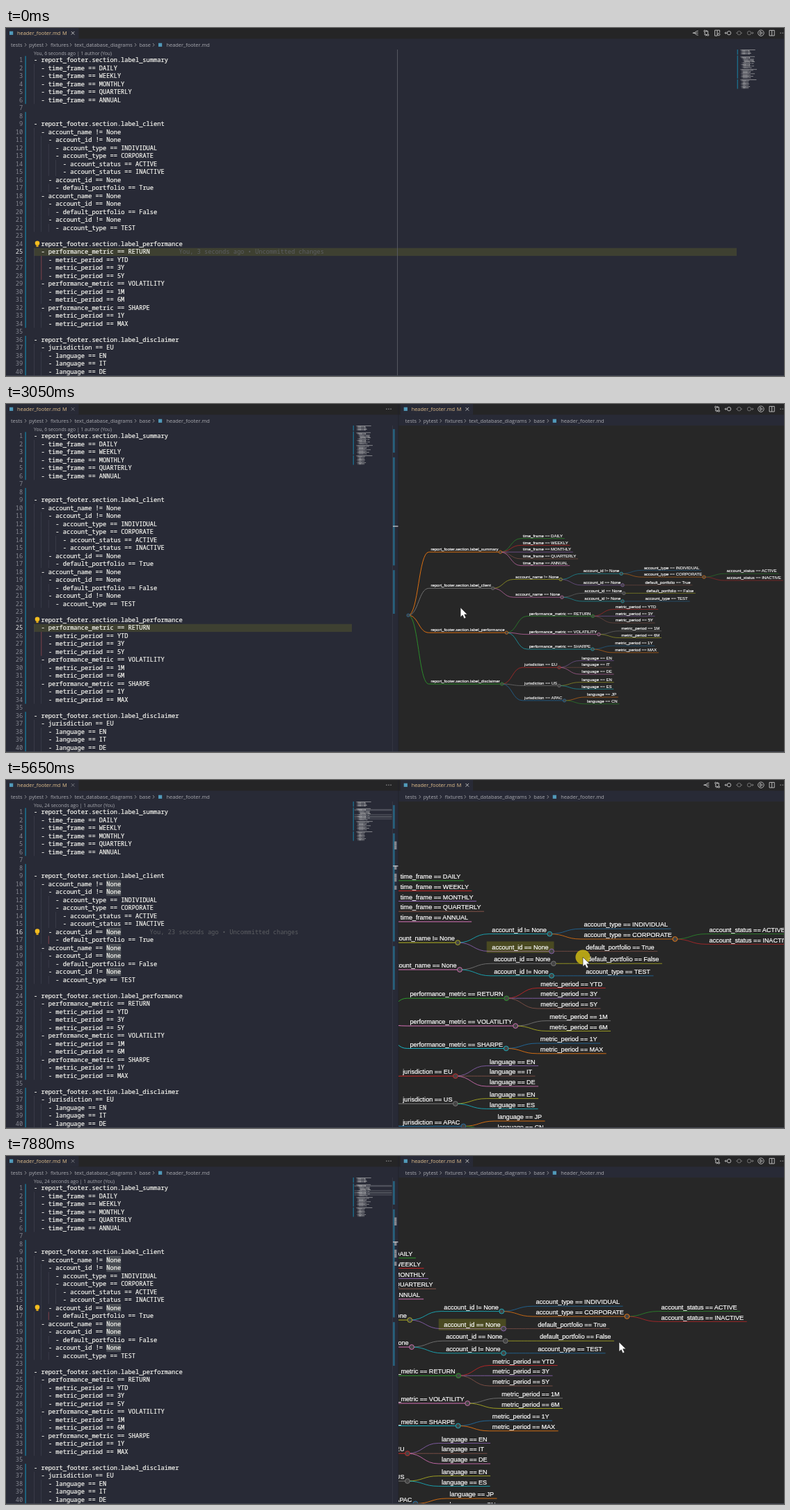
Animation of 1118x501 px, one loop 8 s. Source, as an HTML page:

```html
<!DOCTYPE html>
<html lang="en">
<head>
<meta charset="utf-8">
<title>Outline to mind map</title>
<style>
  html, body { margin: 0; width: 100%; height: 100%; overflow: hidden; background: #282a36; }
  svg { display: block; width: 1118px; height: 501px; }
  text { white-space: pre; }
  .ui { font: 7.4px "Open Sans", "Noto Sans", sans-serif; fill: #a9aab0; }
  .tab { fill: #e2c08d; }
  .code { font: 8.7px "Noto Sans Mono", "DejaVu Sans Mono", monospace; fill: #f8f8f2; }
  .line { stroke: #f8f8f2; stroke-width: .2; }
  .num { fill: #858791; text-anchor: end; }
  .num.on { fill: #e6e6e6; }
  .blame { fill: #5c5e62; }
  .map text { font: 16px "Liberation Sans", Arial, sans-serif; fill: #fff; stroke: #fff; stroke-width: .35; }
  .icon { fill: none; stroke: #c8c8c8; stroke-width: .9; }
</style>
</head>
<body>
<svg id="stage" viewBox="0 0 1118 501"></svg>
<script>
const SOURCE = `- report_footer.section.label_summary
  - time_frame == DAILY
  - time_frame == WEEKLY
  - time_frame == MONTHLY
  - time_frame == QUARTERLY
  - time_frame == ANNUAL


- report_footer.section.label_client
  - account_name != None
    - account_id != None
      - account_type == INDIVIDUAL
      - account_type == CORPORATE
        - account_status == ACTIVE
        - account_status == INACTIVE
    - account_id == None
      - default_portfolio == True
  - account_name == None
    - account_id == None
      - default_portfolio == False
    - account_id != None
      - account_type == TEST

- report_footer.section.label_performance
  - performance_metric == RETURN
    - metric_period == YTD
    - metric_period == 3Y
    - metric_period == 5Y
  - performance_metric == VOLATILITY
    - metric_period == 1M
    - metric_period == 6M
  - performance_metric == SHARPE
    - metric_period == 1Y
    - metric_period == MAX

- report_footer.section.label_disclaimer
  - jurisdiction == EU
    - language == EN
    - language == IT
    - language == DE
  - jurisdiction == US
    - language == EN
    - language == ES
  - jurisdiction == APAC
    - language == JP
    - language == CN`.split('\n');

const PALETTE = ['#1f77b4', '#ff7f0e', '#2ca02c', '#d62728', '#9467bd',
                 '#8c564b', '#e377c2', '#7f7f7f', '#bcbd22', '#17becf'];
const LOOP = 8000, CHAR = 5.22, PITCH = 11.51, TEXT_X = 40, SPLIT = 564;
const GAP = 79, PAD = 7.5;
const CHANGED = [[1, 6], [8, 34], [36, 46]];
const MATCHES = [10, 11, 16, 18, 19, 21];
const stage = document.getElementById('stage');

function el(tag, attrs, parent = stage, text) {
  const node = document.createElementNS('http://www.w3.org/2000/svg', tag);
  set(node, attrs);
  if (text !== undefined) node.textContent = text;
  return parent.appendChild(node);
}
function set(node, attrs) {
  for (const key in attrs) node.setAttribute(key, attrs[key]);
}
const show = (node, on) => node.setAttribute('display', on ? 'inline' : 'none');
const group = (parent = stage, attrs = {}) => el('g', attrs, parent);
const rect = (x, y, width, height, fill, parent, opacity = 1) =>
  el('rect', { x, y, width, height, fill, opacity }, parent);
const label = (x, y, cls, text, parent) => el('text', { x, y, class: cls }, parent, text);
const lineY = n => 46 + (n - 1) * PITCH;
const clamp = v => Math.max(0, Math.min(1, v));
const mix = (a, b, p) => a + (b - a) * p;
const ring = (x, y, r) => `M${x - r} ${y}a${r} ${r} 0 1 0 ${2 * r} 0a${r} ${r} 0 1 0 ${-2 * r} 0`;

// Editor pane
rect(0, 0, 1118, 501, '#282a36');
rect(0, 0, 1118, 15.5, '#252526');
const lineMark = rect(TEXT_X, lineY(25) - 5.5, 1010, 11.3, '#ff0', stage, .1);
const ruler = rect(562, 31, .9, 470, '#5a5c66');
const matches = group();
MATCHES.forEach(n => {
  const col = SOURCE[n - 1].indexOf('None');
  rect(TEXT_X + col * CHAR, lineY(n) - 5.7, 4 * CHAR, 11.3, '#4a4e54', matches);
});
CHANGED.forEach(([a, b]) =>
  rect(27.3, lineY(a) - 5.7, 1.6, (b - a + 1) * PITCH, '#1b6f8e'));

const numbers = SOURCE.map((line, i) => {
  const y = lineY(i + 1), indent = line.search(/\S/);
  for (let c = 0; c < indent; c += 2)
    rect(TEXT_X + c * CHAR, y - 5.7, .6, PITCH, '#454754');
  if (line) label(TEXT_X + indent * CHAR, y + 3, 'code line', line.trim());
  return label(24.3, y + 3, 'code num', i + 1);
});
const guide = rect(0, 0, .8, 0, '#8a4148');
const lens = label(40, 38.6, 'ui', '');
lens.style.fontSize = '6.8px';
const blame = label(0, 0, 'code blame', '');
const bulb = group();
rect(-5, -5, 10, 10, '#282a36', bulb);
el('path', { d: ring(0, -1, 3.3), fill: '#f5bd1f' }, bulb);
rect(-1.6, 1.6, 3.2, 2.8, '#d9a51c', bulb);

// Minimap and overview ruler
const minimap = group();
CHANGED.forEach(([a, b]) =>
  rect(0, 31 + (a - 1) * 1.23, 1.3, (b - a + 1) * 1.23, '#1b6f8e', minimap));
const miniMatches = group(minimap);
MATCHES.forEach(n => rect(2, 30.8 + (n - 1) * 1.23, 54, 1.2, '#8a8d94', miniMatches, .4));
SOURCE.forEach((line, i) => {
  for (const word of line.matchAll(/\S+/g))
    rect(4.6 + word.index * .58, 31 + i * 1.23, word[0].length * .58, .85, '#d0d0d0', minimap, .65);
});
const slider = rect(498, 31, 57, 58, '#fff', stage, .1);
const overview = group();
rect(555.3, 31, .7, 470, '#3a3c48', overview);
CHANGED.forEach(([a, b]) =>
  rect(556, 36.2 + (a - 1) * 5.8, 2.8, (b - a + 1) * 5.8 - 1, '#27607c', overview));
const scrollbar = rect(556, 31, 8, 282, '#fff', overview, .2);
const overMatches = group(overview);
MATCHES.forEach(n => rect(558, 36.2 + (n - 1) * 5.8, 3.4, 5.8, '#83858c', overMatches));
const caretMark = rect(556, 0, 8, 1.3, '#c4c6ca', overview);

// Preview pane
const preview = group();
rect(SPLIT, 0, 554, 16, '#252526', preview);
rect(SPLIT, 15.5, 554, 15.5, '#282a36', preview);
rect(SPLIT, 31, 554, 470, '#272727', preview);
rect(SPLIT - .5, 0, .8, 501, '#20212a', preview);

function header(x, parent) {
  rect(x, 0, 104.5, 15.5, '#282a36', parent);
  rect(x + 5, 4.7, 5.2, 5.2, '#519aba', parent);
  label(x + 16, 10, 'ui tab', 'header_footer.md', parent);
  label(x + 81, 10, 'ui tab', 'M', parent);
  const close = el('path', { d: `M${x + 93.8} 5l4.6 4.6m0-4.6l-4.6 4.6`, class: 'icon' }, parent);
  const crumbs = [[7, 'tests'], [33, 'pytest'], [64, 'fixtures'],
                  [98.5, 'text_database_diagrams'], [191.5, 'base'], [230.5, 'header_footer.md']];
  crumbs.forEach(([dx, word], i) => {
    label(x + dx, 27, 'ui', word, parent);
    const gap = [27, 57, 92, 185, 211][i];
    if (gap) el('path', { d: `M${x + gap} 22l2 2.3-2 2.3`, class: 'icon', opacity: .7 }, parent);
  });
  rect(x + 219, 21.7, 5.2, 5.2, '#519aba', parent);
  return close;
}
const closeLeft = header(0);
const closeRight = header(SPLIT + 2.7, preview);

// Toolbars
const ICONS = {
  fork: 'M-4 0H4M-3 0C0 0 0-3 4-3M-3 0C0 0 0 3 4 3',
  compare: ring(-2.3, -2.8, 1.2) + ring(2.3, 2.8, 1.2) + 'M-2.3-1.6V2.8H.6M2.3 1.6V-2.8H-.6M-.8 1.4L.6 2.8-.8 4.2M.8-4.2L-.6-2.8.8-1.4',
  preview: 'M3.5-.5V-4H-3.5V4H0M0-4V4' + ring(2.2, 2, 1.6),
  back: ring(1.2, 0, 2.7) + 'M-1.5 0H-4.7M-3.2-1.6L-4.7 0-3.2 1.6',
  dot: ring(0, 0, 2.7) + 'M-4.5 0h1.8M2.7 0h1.8',
  next: ring(-1.2, 0, 2.7) + 'M1.5 0H4.7M3.2-1.6L4.7 0 3.2 1.6',
  run: ring(0, 0, 4.2) + 'M-1.2-2.3L2.2 0-1.2 2.3Z',
  split: 'M-3.6-3.8H3.6V3.8H-3.6ZM0-3.8V3.8',
  more: 'M-3.8 0h1.3M-.7 0h1.3M2.4 0h1.3'
};
function toolbar(names, end) {
  const bar = group();
  names.forEach((name, i) => el('path', {
    d: ICONS[name], class: 'icon', opacity: /dot|next/.test(name) ? .5 : 1,
    transform: `translate(${end - (names.length - 1 - i) * 15.7} 7.2)`
  }, bar));
  return bar;
}
const common = ['back', 'dot', 'next', 'run', 'split', 'more'];
const full = ['fork', 'compare', 'preview', ...common];
const hover = rect(984, 1, 14, 13, '#fff', stage, .12);
const barWide = toolbar(full, 1116.3);
const barLeft = toolbar(full, 550);
const barLeftIdle = toolbar(['more'], 550);
const barRight = toolbar(['compare', ...common], 1116.3);
const barRightIdle = toolbar(['more'], 1116.3);
const barFork = toolbar(['fork', 'compare', ...common], 1116.3);

// Mind map
const ctx = document.createElement('canvas').getContext('2d');
ctx.font = '16px "Liberation Sans", Arial, sans-serif';
const root = { depth: 0, x: 0, y: 0, w: 0, h: 0, kids: [] };
const nodes = [root];
const path = [root];
SOURCE.forEach((line, i) => {
  if (!line) return;
  const depth = line.search(/\S/) / 2 + 1, text = line.trim().slice(2);
  const parent = path[depth - 1];
  const node = { depth, text, parent, line: i + 1, y: 0, h: 21, kids: [] };
  node.x = parent.x + parent.w + GAP;
  node.w = ctx.measureText(text).width + 2 * PAD;
  path[depth] = node;
  parent.kids.push(node);
  nodes.push(node);
});
const family = n => [n, ...n.kids.flatMap(family)];

// Stack each subtree as close below its earlier siblings as the boxes allow.
function arrange(n) {
  const placed = [];
  n.kids.forEach(kid => {
    arrange(kid);
    const own = family(kid);
    let shift = placed.length ? -Infinity : 0;
    for (const a of placed) for (const b of own) {
      if (a.x >= b.x + b.w + GAP || b.x >= a.x + a.w + GAP) continue;
      shift = Math.max(shift, a.y + 21 + (a.parent === b.parent ? 5 : 10) - b.y);
    }
    own.forEach(b => b.y += shift);
    placed.push(...own);
  });
  if (n.kids.length) n.y = (n.kids[0].y + n.kids[n.kids.length - 1].y) / 2;
}
arrange(root);

const clip = el('clipPath', { id: 'pane' }, el('defs', {}));
rect(SPLIT, 31, 554, 470, '#000', clip);
const pane = group(stage, { 'clip-path': 'url(#pane)' });
const map = group(pane, { class: 'map' });
const links = group(map), labels = group(map);
let nodeMark;
nodes.forEach((n, i) => {
  const color = PALETTE[i % 10];
  if (n.parent) n.link = el('path', {
    fill: 'none', stroke: color, 'stroke-width': 1.1 + 2.2 / 2 ** n.depth
  }, links);
  n.g = group(labels);
  if (n.line === 16) nodeMark = rect(-6, -14.5, n.w + 12, 29, '#ff0', n.g, .16);
  if (n.kids.length) el('circle', {
    cx: n.w, cy: n.h / 2, r: 6, fill: '#444', stroke: color, 'stroke-width': 1.5
  }, n.g);
  if (n.text) el('text', { x: PAD, y: 5.5 }, n.g, n.text);
});

let lastSpread = -1;
function spreadMap(e) {
  if (e === lastSpread) return;
  lastSpread = e;
  nodes.forEach(n => {
    set(n.g, { transform: `translate(${n.x * e} ${n.y * e})` });
    if (!n.parent) return;
    const p = n.parent;
    const sx = p.x * e + p.w, sy = p.y * e + p.h / 2;
    const tx = n.x * e, ty = n.y * e + n.h / 2, mx = (sx + tx) / 2;
    set(n.link, { d: `M${sx} ${sy}C${mx} ${sy} ${mx} ${ty} ${tx} ${ty}H${tx + n.w}` });
  });
}

// Pointer
rect(0, 500, 1118, 1, '#41444e');
const pointer = group();
const press = el('circle', { r: 10.6, fill: '#c8b414', opacity: .88 }, pointer);
el('path', {
  d: 'M0 0V13.6L3.1 10.8 5.3 15.8 7.8 14.7 5.6 9.8H9.8Z',
  fill: '#fff', stroke: '#222', 'stroke-width': .6
}, pointer);

const POINTER = [
  [190, 1080, 452], [560, 1030, 150], [760, 976, 12], [870, 994, 8], [1400, 994, 8],
  [2030, 514, 187], [2150, 514, 187], [2900, 647, 294], [3000, 647, 294],
  [3500, 857, 263], [4960, 857, 263], [5400, 946, 268], [5650, 829, 255],
  [5910, 763, 258], [6040, 757, 259], [6350, 1066, 222], [6660, 958, 224],
  [6860, 1033, 216], [7000, 1033, 216], [7450, 768, 252], [7740, 815, 256], [7880, 881, 268]
];
const PAN = [[5400, 0, 0], [5650, -117, -13], [5910, -180, -12], [6040, -186, -11]];

function track(keys, t) {
  let i = keys.findIndex(k => k[0] > t);
  if (i < 0) i = keys.length;
  const a = keys[Math.max(0, i - 1)], b = keys[Math.min(i, keys.length - 1)];
  const p = a === b ? 0 : clamp((t - a[0]) / (b[0] - a[0])), s = p * p * (3 - 2 * p);
  return [mix(a[1], b[1], s), mix(a[2], b[2], s)];
}
const within = (t, a, b) => t >= a && t < b;

function drawMap(t) {
  const u = clamp((t - 1915) / 500);
  const e = u < .5 ? 4 * u ** 3 : 1 - (2 - 2 * u) ** 3 / 2;
  show(pane, t >= 1915);
  spreadMap(e);
  set(links, { opacity: e });
  set(labels, { opacity: clamp(u * 2) });
  const steps = [4620, 4700, 4840].filter(s => t >= s).length;
  const zoom = 2 ** (steps * .2), [px, py] = track(PAN, t);
  const x = 857 + (mix(512, 578, e) - 857) * zoom + px;
  const y = 263 + (mix(93, 189.7, e) - 263) * zoom + py;
  set(map, { transform: `translate(${x} ${y}) scale(${mix(.5, .375, e) * zoom})` });
  show(nodeMark, t >= 3830);
}

function drawEditor(t) {
  const open = t >= 1360, moved = t >= 3640, marked = t >= 3830;
  const leftFocus = !open || within(t, 3640, 5500);
  show(preview, open);
  show(overview, open);
  show(ruler, !open);
  set(minimap, { transform: `translate(${open ? 498.6 : 1050.6} 0)` });
  set(lineMark, { width: open ? 457 : 1010 });
  show(lineMark, !moved);
  [matches, miniMatches, overMatches].forEach(g => show(g, marked));

  const hovered = within(t, 1850, 2300);
  show(slider, hovered);
  show(scrollbar, hovered || within(t, 3640, 5040));
  set(caretMark, { y: 36.2 + (moved ? 15 : 24) * 5.8 });

  numbers[24].classList.toggle('on', !moved);
  numbers[15].classList.toggle('on', moved);
  set(guide, moved
    ? { x: TEXT_X + 4 * CHAR, y: lineY(17) - 5.7, height: PITCH }
    : { x: TEXT_X + 2 * CHAR, y: lineY(26) - 5.7, height: 3 * PITCH });
  set(bulb, { transform: `translate(45 ${lineY(t >= 4000 ? 16 : 24)})` });
  lens.textContent = `You, ${t >= 4200 ? 24 : 6} seconds ago | 1 author (You)`;
  blame.textContent = `You, ${moved ? 23 : 3} seconds ago • Uncommitted changes`;
  set(blame, { x: moved ? 206.5 : 248.5, y: lineY(moved ? 16 : 25) + 3 });
  show(blame, t < 1140 || within(t, 3830, 5780));

  set(closeLeft, { opacity: leftFocus ? 1 : .5 });
  set(closeRight, { opacity: leftFocus ? .5 : 1 });
  show(hover, within(t, 760, 1360));
  show(barWide, !open);
  show(barLeft, open && leftFocus);
  show(barRightIdle, open && leftFocus);
  show(barLeftIdle, open && !leftFocus);
  show(barFork, within(t, 5500, 5780));
  show(barRight, open && !leftFocus && !within(t, 5500, 5780));
}

function drawPointer(t) {
  const [x, y] = track(POINTER, t);
  set(pointer, { transform: `translate(${x} ${y})` });
  show(pointer, t >= 190);
  show(press, within(t, 1070, 1210) || within(t, 3560, 3680) || within(t, 5360, 6040));
}

const start = performance.now();
function tick(now) {
  const t = Math.max(0, now - start) % LOOP;
  drawEditor(t);
  drawMap(t);
  drawPointer(t);
  requestAnimationFrame(tick);
}
tick(start);
</script>
</body>
</html>
```
